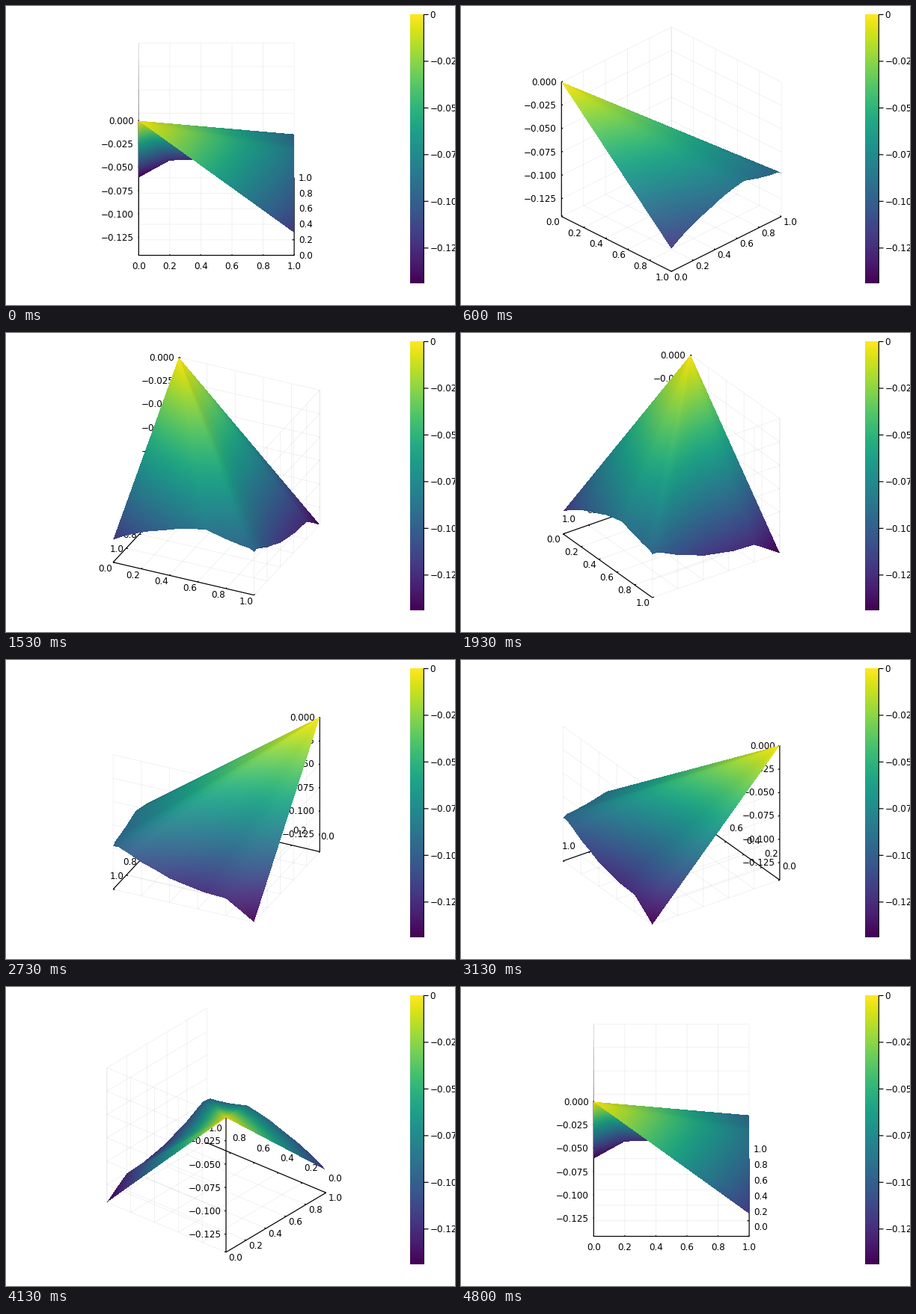
These frames come from a looping animation (600 by 400 pixels, 4870 ms). A matplotlib script:

```python
import numpy as np
import matplotlib
import matplotlib.pyplot as plt
from matplotlib.animation import FuncAnimation
from matplotlib.collections import LineCollection

W, H, DPI = 600, 400, 100
LOOP_MS, STEPS, TURN = 4870, 73, 5
SUB = 4  # animation frames per camera step
SIDE, CX, CY = 207.8, 281.2, 191.6
ELEV = np.radians(30)
DEPTH = 0.1439
PX = 72 / DPI
FONT, HALF = 8.6, 4.3  # label size in points, half a digit in pixels

matplotlib.rcParams["font.family"] = "DejaVu Sans"
viridis = matplotlib.colormaps["viridis"]

ticks = np.arange(6) / 5
levels = -0.025 * np.arange(6)
heights = 1 + levels / DEPTH

# Height below the apex along the two outer edges (position, drop).
edge_x1 = [(0, .1197), (.08, .1128), (.16, .1075), (.24, .1026), (.36, .0970),
           (.48, .0910), (.58, .0880), (.66, .0859), (.79, .0908), (.90, .0938),
           (.97, .0950), (1, .0977)]
edge_y1 = [(.96, .0975), (.90, .1012), (.80, .1080), (.70, .1127), (.60, .1182),
           (.50, .1209), (.36, .1245), (.20, .1256), (.10, .1346), (0, DEPTH)]
rim = np.array([(1, t, 1 - d / DEPTH) for t, d in edge_x1]
               + [(t, 1, 1 - d / DEPTH) for t, d in edge_y1])
apex = np.array([0.0, 0.0, 1.0])


def rim_normals():
    """Unit normals at the rim points, averaged over neighbouring facets."""
    facets = np.cross(rim[:-1] - apex, rim[1:] - apex)
    facets /= np.linalg.norm(facets, axis=1, keepdims=True)
    mean = np.vstack([facets[:1], (facets[:-1] + facets[1:]) / 2, facets[-1:]])
    return mean / np.linalg.norm(mean, axis=1, keepdims=True)


normals = rim_normals()


def project(points, az):
    """Orthographic view of unit-cube points: screen x, y and nearness."""
    p = np.asarray(points, float) - 0.5
    c, s = np.cos(az), np.sin(az)
    right = p[..., 0] * c + p[..., 1] * s
    away = p[..., 1] * c - p[..., 0] * s
    up = p[..., 2]
    x = CX + SIDE * right
    y = CY - SIDE * (away * np.sin(ELEV) + up * np.cos(ELEV))
    near = up * np.sin(ELEV) - away * np.cos(ELEV)
    return np.stack([x, y, near], axis=-1)


def render_surface(az):
    """Depth-buffered fan of triangles from the apex to the rim."""
    top = project(apex, az)
    pts = project(rim, az) - top
    view = np.array([np.sin(az) * np.cos(ELEV), -np.cos(az) * np.cos(ELEV), np.sin(ELEV)])
    facing = np.abs(normals @ view)
    drop = 1 - rim[:, 2]

    near = np.full((H, W), -np.inf)
    value = np.zeros((H, W))
    light = np.zeros((H, W))
    for i in range(len(rim) - 1):
        p, q = pts[i], pts[i + 1]
        det = p[0] * q[1] - p[1] * q[0]
        if abs(det) < 1e-6:
            continue
        corners = np.array([top[:2], top[:2] + p[:2], top[:2] + q[:2]])
        x0, y0 = np.floor(corners.min(axis=0)).astype(int)
        x1, y1 = np.ceil(corners.max(axis=0)).astype(int) + 1
        dx = np.arange(x0, x1)[None, :] + 0.5 - top[0]
        dy = np.arange(y0, y1)[:, None] + 0.5 - top[1]
        a = (dx * q[1] - dy * q[0]) / det
        b = (dy * p[0] - dx * p[1]) / det
        total = a + b
        box = np.s_[y0:y1, x0:x1]
        n = top[2] + a * p[2] + b * q[2]
        hit = (a >= 0) & (b >= 0) & (total <= 1) & (n > near[box])
        mix = b[hit] / np.maximum(total[hit], 1e-9)
        near[box][hit] = n[hit]
        value[box][hit] = 1 - a[hit] * drop[i] - b[hit] * drop[i + 1]
        light[box][hit] = facing[i] * (1 - mix) + facing[i + 1] * mix

    seen = np.isfinite(near)
    image = np.zeros((H, W, 4), np.uint8)
    rgb = viridis(value[seen])[:, :3]
    lit = light[seen][:, None]
    rgb = rgb * (0.87 + 0.13 * lit)
    rgb += (1 - rgb) * 0.08 * lit ** 12
    image[seen, :3] = np.round(rgb * 255)
    image[seen, 3] = 255
    return image


def grid_lines():
    lines = []
    for t in ticks:
        lines += [[(t, 0, 0), (t, 1, 0)], [(t, 1, 0), (t, 1, 1)],
                  [(0, t, 0), (1, t, 0)], [(0, t, 0), (0, t, 1)]]
    for h in heights:
        lines += [[(0, 0, h), (0, 1, h)], [(0, 1, h), (1, 1, h)]]
    return np.array(lines, float)


def axis_lines():
    k = 0.0125
    lines = [[(0, 0, 0), (1, 0, 0)], [(1, 0, 0), (1, 1, 0)], [(0, 0, 0), (0, 0, 1)]]
    for t in ticks:
        lines += [[(t, 0, 0), (t, k, 0)], [(1, t, 0), (1 - k, t, 0)]]
    lines += [[(0, 0, h), (0, k, h)] for h in heights]
    return np.array(lines, float)


grid3d, axes3d = grid_lines(), axis_lines()
x_ticks = np.array([(t, 0, 0) for t in ticks])
y_ticks = np.array([(1, t, 0) for t in ticks])
z_ticks = np.array([(0, 0, h) for h in heights])
azimuths = np.radians(TURN * np.arange(STEPS))
surfaces = [render_surface(az) for az in azimuths]

fig = plt.figure(figsize=(W / DPI, H / DPI), dpi=DPI, facecolor="white")
ax = fig.add_axes([0, 0, 1, 1])
ax.axis("off")


def label(text, x=0, y=0, ha="left"):
    return ax.text(x, y + HALF, text, fontsize=FONT, ha=ha, va="baseline", zorder=3)


def level_text(v):
    return f"{v:.3f}".replace("-", "\u2212") if v else "0.000"


grid = LineCollection([], colors=[(0, 0, 0, 0.055)], linewidths=PX, zorder=1, snap=False)
axis = LineCollection([], colors="black", linewidths=1.2 * PX, zorder=2, snap=False)
ax.add_collection(grid)
ax.add_collection(axis)
x_labels = [label(f"{t:.1f}") for t in ticks]
y_labels = [label(f"{t:.1f}") for t in ticks]
z_labels = [label(level_text(v), ha="right") for v in levels]
surface = ax.imshow(surfaces[0], extent=(0, W, H, 0),
                    interpolation="nearest", aspect="auto", zorder=5)


def draw_colorbar():
    top, bottom = 11.5, 371
    ramp = np.linspace(1, 0, 360)[:, None]
    ax.imshow(ramp, cmap=viridis, extent=(540, 558, bottom, top),
              interpolation="nearest", aspect="auto", zorder=1)
    lines = [[(558.3, top), (558.3, bottom)]]
    for v in levels:
        y = top - v / DEPTH * (bottom - top)
        lines.append([(558.3, y), (564.5, y)])
        label(level_text(v) if v else "0", 566.4, y)
    ax.add_collection(LineCollection(lines, colors="black", linewidths=1.2 * PX,
                                     zorder=2, snap=False))


draw_colorbar()
ax.set_xlim(0, W)
ax.set_ylim(H, 0)


def label_style(angle, first):
    """Alignment and offset of floor labels for an axis seen at this angle."""
    r = np.radians(angle)
    nx, ny = -0.5 * np.sin(r), np.cos(r)
    size = np.hypot(nx, ny)
    dx, dy = 6 * nx / size, 8 * ny / size
    if angle == 0:
        return "center", dx, dy + 6.5
    if angle <= 90:
        return "right", dx, dy
    if angle <= 270 and not first:
        return "left", dx, dy - 12.5
    return "left", dx, dy


def place(labels, points, az, ha, dx, dy):
    for text, (x, y, _) in zip(labels, project(points, az)):
        text.set_ha(ha)
        text.set_position((x + dx, y + dy + HALF))


def update(i):
    # Each step begins one short frame early, ahead of its rounded start time.
    step = min((i + 1) // SUB, STEPS - 1)
    deg, az = step * TURN, azimuths[step]
    grid.set_segments(project(grid3d, az)[..., :2])
    axis.set_segments(project(axes3d, az)[..., :2])
    place(x_labels, x_ticks, az, *label_style(deg % 360, False))
    place(y_labels, y_ticks, az, *label_style((deg - 90) % 360, step == 0))
    place(z_labels, z_ticks, az, "right", -6.3, 0)
    surface.set_data(surfaces[step])
    return grid, axis, surface, *x_labels, *y_labels, *z_labels


anim = FuncAnimation(fig, update, frames=STEPS * SUB, interval=LOOP_MS / (STEPS * SUB),
                     repeat=True, repeat_delay=0, blit=False)
plt.show()
```
